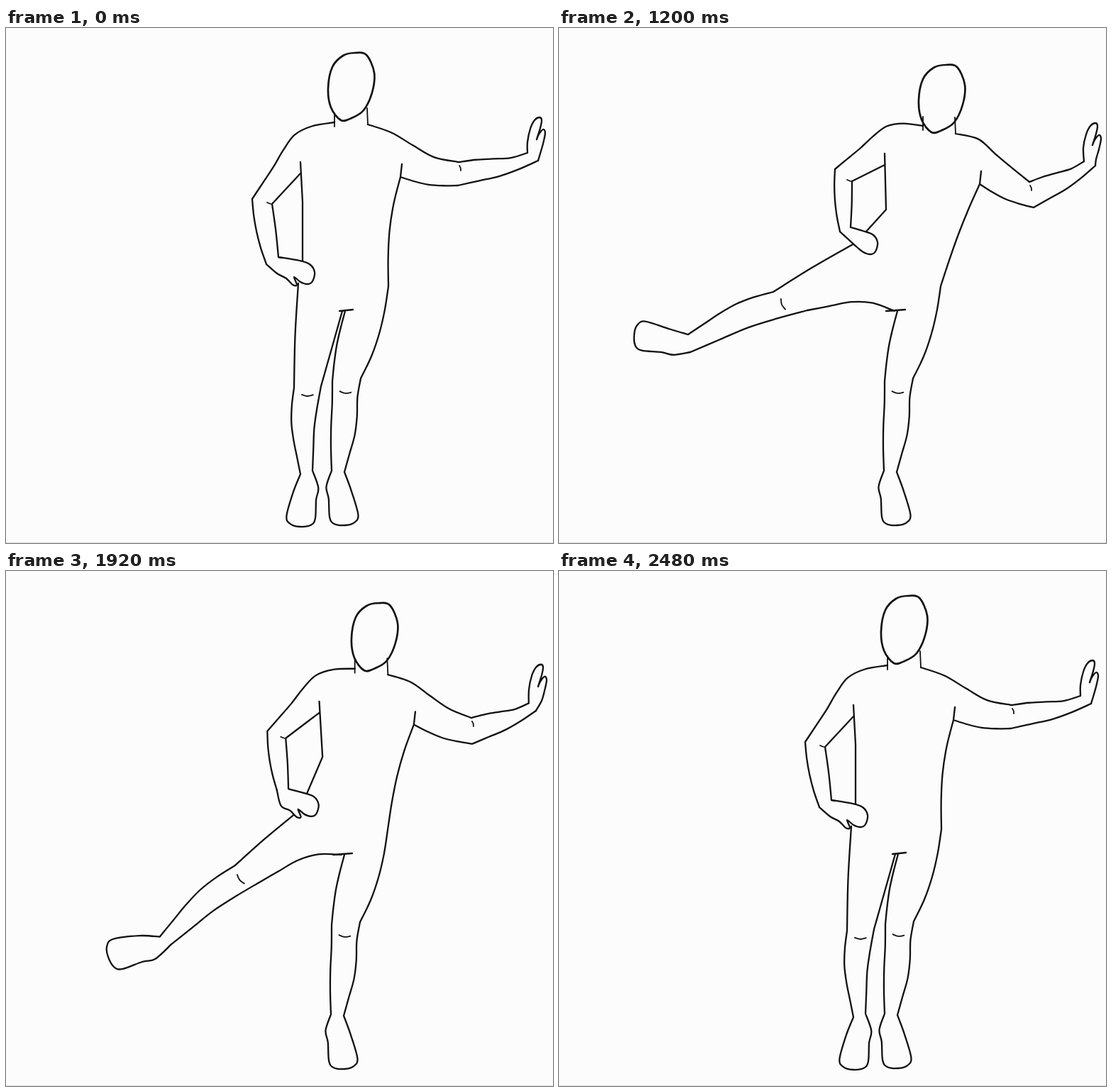
An HTML page that plays this animation: 771 px wide and 726 px high, repeating every 3120 ms.

```html
<!DOCTYPE html>
<html lang="en">
<head>
<meta charset="utf-8">
<title>Side leg swing</title>
<style>
  html, body { margin: 0; width: 100%; height: 100%; overflow: hidden; background: #fcfcfc; }
  svg { display: block; width: 100%; height: 100%; }
  path { fill: none; stroke: #111; stroke-width: 2.3; stroke-linecap: round; stroke-linejoin: round; }
  #crease { stroke-width: 1.8; }
  #head { stroke-width: 2.7; }
  #hands { fill: #fcfcfc; }
</style>
</head>
<body>
<svg viewBox="0 0 771 726" preserveAspectRatio="none">
  <rect y="725" width="771" height="1" fill="#dedede"/>
  <g id="figure">
    <path id="outline"/><path id="hands"/><path id="head"/><path id="crease"/>
  </g>
</svg>
<script>
const LOOP = 3120;
const PIVOT = [430, 340];

// start ms, pose (0 stand, 1 lean, 2 low lift, 3 high lift), shift x, shift y
const steps = [
  [0, 0, 1, 0], [640, 1, 0, 0], [800, 1.5, 1, -1], [880, 2, 1.5, -1],
  [1040, 2.5, 0, 0], [1200, 3, 0, 0], [1440, 3.35, 0, 0], [1680, 3, 0, 1],
  [1920, 2.5, 0, 1], [2160, 2, 1.5, 1], [2240, 1.5, 1, 1], [2320, 1, 0, 1],
  [2480, 0, 1, 0]
];

const read = text => text.split(' ').map(pair => pair.split(',').map(Number));
const readAll = table =>
  Object.fromEntries(Object.entries(table).map(([name, text]) => [name, read(text)]));

// Body joints: stand, lean, high lift
const body = readAll({
  head: '-23,-5 0,0 31,12',
  neckL: '462,133 480,136 513,138',
  elbowL: '346,241 357,239 389,199',
  wristL: '366,333 374,319 396,287',
  pitL: '414,205 432,202 459,193',
  elbowIn: '374,248 384,245 413,216',
  wristIn: '383,323 391,320 411,281',
  waist: '417,245 438,264 461,256',
  knuckle: '434,344 436,342 449,302',
  hip: '411,360 406,359 416,304',
  neckR: '509,136 527,143 559,149',
  elbowTop: '637,189 652,200 663,217',
  wristTop: '734,176 735,184 740,188',
  tip: '751,126 753,129 756,134',
  wristLow: '749,187 742,197 756,194',
  elbowLow: '636,222 651,237 669,253',
  pitR: '555,210 565,213 593,220'
});

// Swinging leg joints: stand, lean, low lift, high lift
const swinging = readAll({
  kneeOut: '405,507 390,508 356,447 302,372',
  kneeIn: '443,505 426,513 381,478 350,398',
  ankleOut: '414,629 384,634 279,584 182,432',
  ankleIn: '431,624 402,634 299,576 185,457',
  toe: '413,703 371,703 220,638 106,432'
});

const standing = {
  hip: [538, 364], crotch: [477, 399], kneeOut: [499, 494], kneeIn: [459, 498],
  ankleOut: [476, 626], ankleIn: [458, 624], toe: [477, 701]
};

const headShape = read('514,40 530,43 541,68 538,96 526,121 509,132 494,135 480,117 476,90 482,60 497,44');
// Measured along the foot and outwards from it
const footShape = read('30,15 64,20 74,13 76,0 72,-15 62,-20 36,-18 19,-19');
// Relative to the fingertip and to the knuckle
const raisedHand = read('-17,35 -13,16 -7,4 0,0 3,4 1,15 -4,31 -1,24 5,17 8,22 5,37 1,51');
const restingHand = read('-21,-16 -7,-11 0,0 -3,13 -10,17 -20,14 -29,7');
const thumb = read('-25,18 -31,18 -40,9 -53,2');

const mix = (a, b, t) => a + (b - a) * t;
const clamp = t => Math.max(0, Math.min(1, t));
const blend = (a, b, t) => [mix(a[0], b[0], t), mix(a[1], b[1], t)];
const add = (p, x, y) => [p[0] + x, p[1] + y];

// Unit vector from a to b, its normal and the distance.
function frame(a, b) {
  const length = Math.hypot(b[0] - a[0], b[1] - a[1]);
  const u = [(b[0] - a[0]) / length, (b[1] - a[1]) / length];
  return { u, n: [-u[1], u[0]], length };
}

const place = (o, { u, n }, along, out) =>
  [o[0] + u[0] * along + n[0] * out, o[1] + u[1] * along + n[1] * out];

// Turns a point around the hip.
function swing(a, b, t) {
  const polar = p => {
    const x = PIVOT[0] - p[0], y = p[1] - PIVOT[1];
    return [Math.hypot(x, y), Math.atan2(y, x)];
  };
  const [ra, aa] = polar(a), [rb, ab] = polar(b);
  const r = mix(ra, rb, clamp(t)), angle = mix(aa, ab, t);
  return [PIVOT[0] - r * Math.cos(angle), PIVOT[1] + r * Math.sin(angle)];
}

// Smooth curve through all points.
function curve(pts, closed) {
  const n = pts.length;
  const at = i => closed ? pts[(i + n) % n] : pts[Math.max(0, Math.min(n - 1, i))];
  let d = 'M' + pts[0].join();
  for (let i = 0; i < (closed ? n : n - 1); i++) {
    const [p, a, b, q] = [at(i - 1), at(i), at(i + 1), at(i + 2)];
    const c1 = [0, 1].map(k => a[k] + (b[k] - p[k]) / 6);
    const c2 = [0, 1].map(k => b[k] - (q[k] - a[k]) / 6);
    d += `C${c1} ${c2} ${b}`;
  }
  return d + (closed ? 'Z' : '');
}

// Line from a to b, bulging at even intervals by percentages of its length.
function edge(a, b, ...bulges) {
  const f = frame(a, b);
  const inner = bulges.map((bulge, i) =>
    place(a, f, f.length * (i + 1) / (bulges.length + 1), f.length * bulge / 100));
  return curve([a, ...inner, b]);
}

function leg(j, side, thighOut, calfOut, thighIn, calfIn) {
  const line = (a, b, bulges) => edge(a, b, ...bulges.map(v => v * side));
  const ankle = blend(j.ankleOut, j.ankleIn, .5);
  const foot = frame(ankle, j.toe), scale = foot.length / 76;
  const sole = footShape.map(([along, out]) => place(ankle, foot, along * scale, out * scale * side));
  return line(j.hip, j.kneeOut, thighOut) + line(j.kneeOut, j.ankleOut, calfOut) +
    line(j.crotch, j.kneeIn, thighIn) + line(j.kneeIn, j.ankleIn, calfIn) +
    curve([j.ankleOut, ...sole, j.ankleIn]);
}

function kneeCrease(j, gap) {
  const knee = blend(j.kneeOut, j.kneeIn, .5);
  const shin = frame(knee, blend(j.ankleOut, j.ankleIn, .5));
  return curve([-8, 0, 8].map(out => place(knee, shin, gap + (out ? 0 : 2), out)));
}

function drawPose(pose) {
  const from = Math.min(Math.floor(pose), 2), t = pose - from;
  const lift = clamp(pose - 2) ** 1.5;
  const b = {}, l = { crotch: [473, 399] };
  for (const name in body) {
    const [stand, lean, high] = body[name];
    b[name] = pose < 1 ? stand : blend(lean, high, lift);
  }
  for (const name in swinging) {
    const keys = swinging[name];
    l[name] = t ? swing(keys[from], keys[from + 1], t) : keys[from];
  }
  l.hip = b.hip;

  const spread = clamp((425 - l.kneeIn[0]) / 44);
  const open = 1 - .6 * lift;
  const bentArm = edge(b.neckL, b.elbowL, 11, 16, 13, 8, 4) + edge(b.elbowL, b.wristL, 3, 4, 3) +
    edge(b.pitL, b.elbowIn) + edge(b.elbowIn, b.wristIn, -1);
  const stretchedArm = edge(b.neckR, b.elbowTop, ...[-1.5, 2, 5].map(v => v - 7.5 * lift)) +
    edge(b.elbowTop, b.wristTop, 0, 2, 4) + edge(b.wristLow, b.elbowLow, -3, -4, -2) +
    edge(b.pitR, b.elbowLow, 4, 6, 4);
  const torso = edge(add(b.pitL, 0, -16), b.waist) + edge(b.waist, add(b.knuckle, -17, -14)) +
    edge(add(b.pitR, 2, -18), b.pitR) +
    edge(b.pitR, standing.hip, 3.5 * open, 4.5 * open, 3 * open) +
    edge(add(l.crotch, -4 - 8 * spread, 0), [488, 397]);
  const legs = leg(l, 1, [1], [4, 6, 5, 2.5], [9, 10, 5].map(v => v * spread), [2, 3, 1.5]) +
    leg(standing, -1, [3.5, 5, 4], [0, 3, 4, 2], [-2, -3, -2], [0, -1, -1]);
  const gripping = lift < .9 ? thumb : [];

  const paths = {
    outline: bentArm + stretchedArm + torso + legs,
    hands:
      curve([b.wristIn, ...[...restingHand, ...gripping].map(p => add(b.knuckle, ...p)), b.wristL]) +
      curve([b.wristTop, ...raisedHand.map(p => add(b.tip, ...p)), b.wristLow]),
    head: curve(headShape.map(p => add(p, ...b.head)), true),
    crease: edge(add(b.neckL, 0, -13), add(b.neckL, 0, 6)) + edge(add(b.neckR, -1, -23), b.neckR) +
      edge(add(b.elbowIn, -7, -2), add(b.elbowIn, -2, 0)) +
      edge(add(b.elbowTop, 1, 5), add(b.elbowTop, 3, 12), -10) +
      kneeCrease(l, 11) + kneeCrease(standing, 17)
  };
  for (const id in paths) document.getElementById(id).setAttribute('d', paths[id]);
}

const figure = document.getElementById('figure');
let shown;
function draw() {
  const time = performance.now() % LOOP;
  const step = steps.findLast(s => s[0] <= time);
  if (step !== shown) {
    shown = step;
    const [, pose, dx, dy] = step;
    figure.setAttribute('transform', `translate(${dx} ${dy})`);
    drawPose(pose);
  }
  requestAnimationFrame(draw);
}
draw();
</script>
</body>
</html>
```
